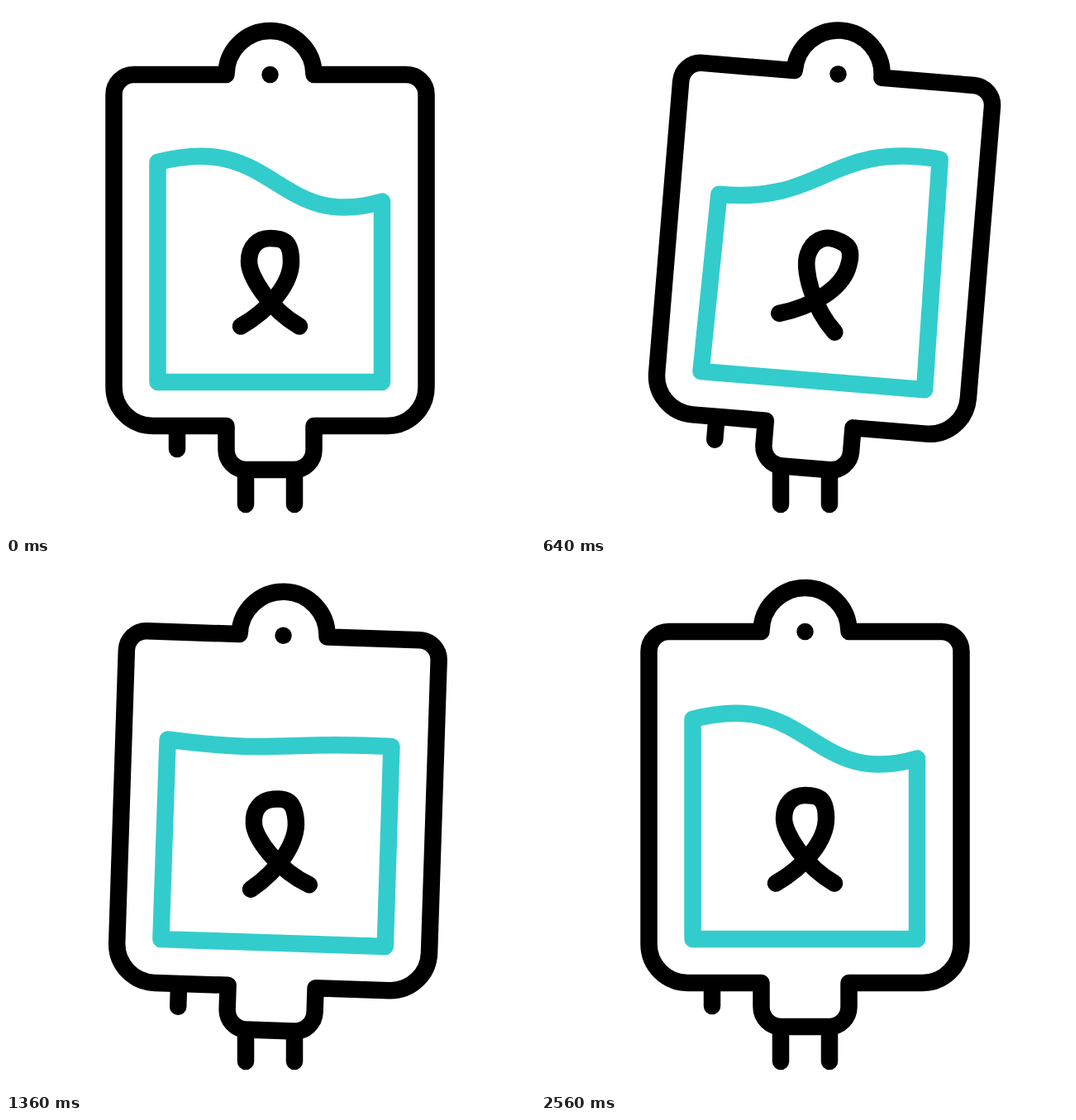
Recreate the animation shown at these times as an HTML page. Size 640 by 640 pixels, loop 2600 ms.

```html
<!DOCTYPE html>
<html lang="en">
<head>
<meta charset="utf-8">
<title>Infusion bag</title>
<style>
  html, body { margin: 0; width: 100%; height: 100%; overflow: hidden; background: #fff; }
  svg { display: block; width: 100vw; height: 100vh; }
  path { fill: none; stroke: #000; stroke-width: 20.5; stroke-linecap: round; stroke-linejoin: round; }
  #shell { fill: #fff; }
  #fluid { stroke: #3cc; }
</style>
</head>
<body>
<svg viewBox="0 0 640 640">
  <path d="M290 556V603M349 556V603"/>
  <g id="bag">
    <path d="M207 508V536"/>
    <path id="shell" d="M266.5 83a53 53 0 0 1 106 0h112a24 24 0 0 1 24 24v354a47 47 0 0 1-47 47h-89v29a24 24 0 0 1-24 24h-58a24 24 0 0 1-24-24v-29h-89a47 47 0 0 1-47-47v-354a24 24 0 0 1 24-24z"/>
    <circle cx="319.5" cy="83" r="10.25"/>
    <path id="fluid"/>
    <path id="ribbon" d="M284 387.5C320 367 345 335 345 309S334 281 319.5 281S294 291 294 309S319 367 355 387.5"/>
  </g>
</svg>
<script>
  const LOOP = 2600, STEP = 360, LEFT = 183.5, RIGHT = 455, BOTTOM = 455;
  const [bag, fluid, ribbon] = ['bag', 'fluid', 'ribbon'].map(id => document.getElementById(id));

  const smooth = u => u * u * (3 - 2 * u);

  // Ease through values, each reached at its own time
  function glide(t, times, values) {
    return values.reduce((v, next, i) => {
      const from = i ? times[i - 1] : 0;
      const u = Math.min(1, Math.max(0, (t - from) / (times[i] - from)));
      return v + (next - v) * smooth(u);
    });
  }

  // Start at rest, reach the first value at `first`, then one more every STEP
  const swing = (t, first, ...values) =>
    glide(t, [0, ...values.map((_, i) => first + i * STEP)], [0, ...values]);

  // The fluid sloshes to and fro, then settles
  const slosh = (t, rest, ...poses) => glide(t, [0, 560, 1120, 1640, 2560], [rest, ...poses, rest]);

  function surface(t) {
    const inset = slosh(t, 0, 4.5, 0.5, 0);
    const y1 = slosh(t, 189, 243, 183, 251);
    const c1 = slosh(t, 151, 245, 184, 279);
    const c2 = slosh(t, 274, 160, 235, 180);
    const y2 = slosh(t, 236.5, 172.5, 227, 195);
    const mid = 320 + (c2 - c1) / 18;
    return `M${LEFT + inset} ${y1}C${mid} ${c1} ${mid} ${c2} ${RIGHT - inset} ${y2}`;
  }

  function draw(t) {
    const lift = swing(t, 400, 31, -13.6, 17.7, 0);
    const tilt = swing(t - 204, 400, 5, -5, 2, -2, 0);
    const sway = swing(t, 760, 15, -16, -3, 0);
    bag.setAttribute('transform', `translate(0 ${lift}) rotate(${tilt} 319.5 571)`);
    ribbon.setAttribute('transform', `rotate(${sway} 319.5 334)`);
    fluid.setAttribute('d', `${surface(t)}V${BOTTOM}H${LEFT}Z`.replace('V', `L${RIGHT} ${BOTTOM}V`));
  }

  const start = performance.now();
  function tick() {
    draw((performance.now() - start) % LOOP);
    requestAnimationFrame(tick);
  }
  tick();
</script>
</body>
</html>
```
